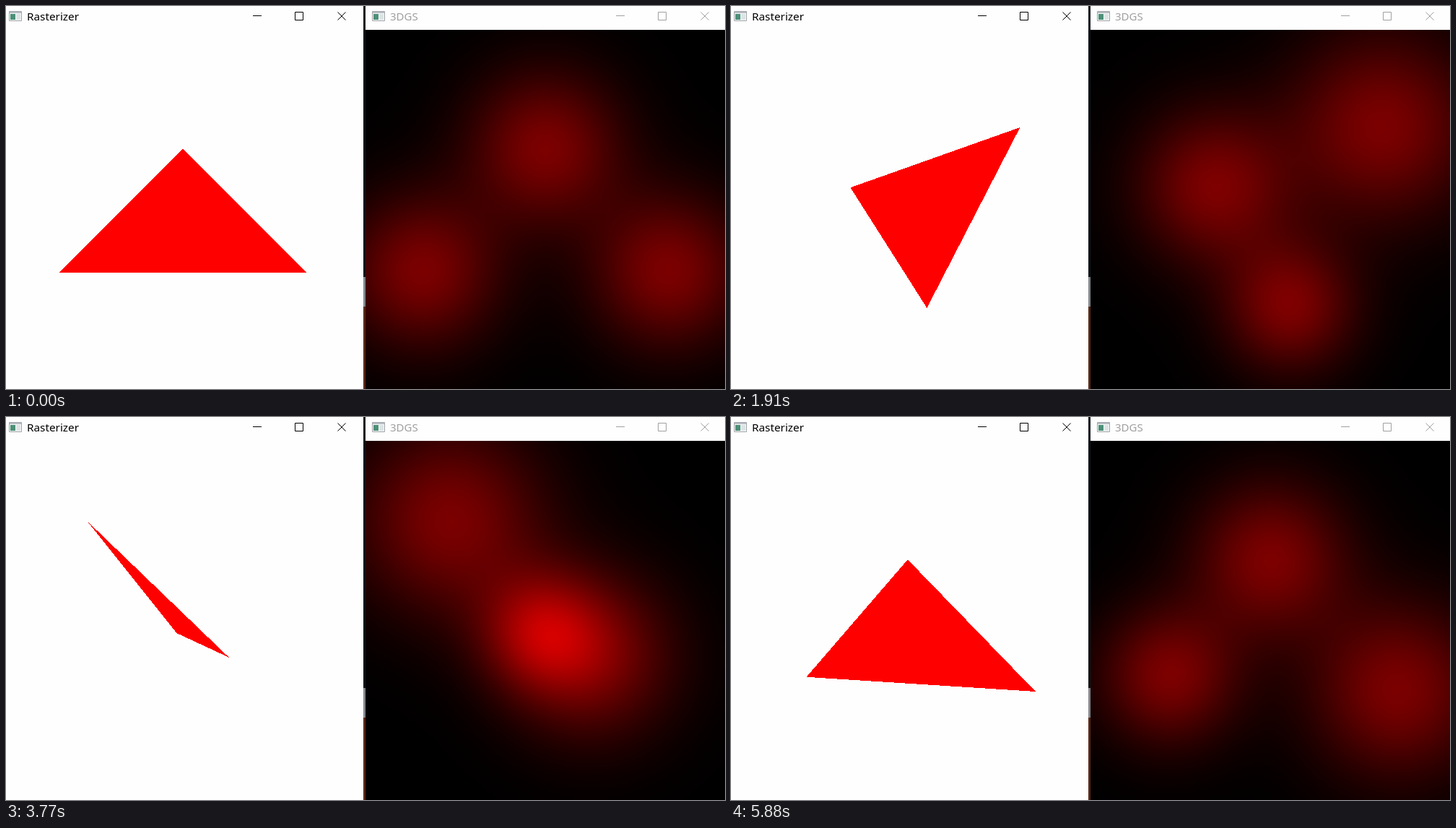
Animation of 996 by 530 pixels, one loop 6.4 s. Source, as an HTML page with a canvas:

```html
<!DOCTYPE html>
<html lang="en">
<head>
<meta charset="utf-8">
<title>Rasterizer and 3DGS</title>
<style>
  html, body { margin: 0; width: 996px; height: 530px; overflow: hidden; background: #fefefe; }
  svg, canvas { position: absolute; left: 0; top: 0; }
  canvas { left: 498px; top: 33px; width: 498px; height: 497px; }
  text { font: 15.3px "Noto Sans", "Open Sans", sans-serif; }
</style>
</head>
<body>
<svg width="996" height="530">
  <defs>
    <g id="icon">
      <path d="M.5 .5h17v13h-17z" fill="#f6f8f8" stroke="#a0a4a8"/>
      <path d="M1 1h16v2h-16z" fill="#b8bcc4"/>
      <path d="M2 4h7v8h-7z" fill="#4c9078"/>
      <path d="M10 4h6v8h-6z" fill="#dce4e4"/>
    </g>
    <path id="buttons" d="M0 13.5h12M58.5 8.5h11v11h-11zM117.5 8.5l11 11M128.5 8.5l-11 11" fill="none"/>
  </defs>
  <rect x="495" width="3" height="530" fill="#101418"/>
  <rect x="495" y="375" width="3" height="41" fill="#84888c"/>
  <rect x="495" y="416" width="3" height="114" fill="#582818"/>
  <use href="#icon" x="4" y="7"/>
  <use href="#icon" x="507" y="7"/>
  <text x="29" y="20">Rasterizer</text>
  <text x="532" y="20" fill="#a0a0a0" style="font-size:15px">3DGS</text>
  <use href="#buttons" x="342" stroke="#000"/>
  <use href="#buttons" x="845" stroke="#a0a0a0"/>
  <polygon id="tri" fill="#f00" shape-rendering="crispEdges"/>
</svg>
<canvas id="splats" width="125" height="125"></canvas>
<script>
const LOOP = 6400, STEP = 40, CELL = 4;
const FOCAL = 600, EYE = 7, CENTER_Y = 283;
const PEAK = 122, SPREAD = 11200;
const corners = [[0, 1], [-2, -1], [2, -1]];
const yaw = deg => [Math.cos(deg * Math.PI / 360), 0, Math.sin(deg * Math.PI / 360), 0];

// Orientation keys: time in ms, quaternion w x y z
const keys = [
  [0, yaw(0)],
  [200, yaw(0)],
  [1380, [-.04, .859, -.334, -.39]],
  [2430, [-.397, -.02, -.91, .117]],
  [3120, [-.297, -.865, -.217, -.341]],
  [3770, [-.465, -.653, -.116, .587]],
  [4380, yaw(-33)],
  [4620, yaw(-33)],
  [5150, yaw(40)],
  [5880, yaw(156)],
  [LOOP, yaw(156)]
];

const tri = document.getElementById('tri');
const ctx = document.getElementById('splats').getContext('2d');
const size = ctx.canvas.width;
const image = ctx.createImageData(size, size);

const normalize = q => {
  const length = Math.hypot(...q);
  return q.map(v => v / length);
};

function slerp(a, b, u) {
  let dot = a.reduce((sum, v, i) => sum + v * b[i], 0);
  const sign = dot < 0 ? -1 : 1;
  dot = Math.min(1, dot * sign);
  const angle = Math.acos(dot);
  if (angle < 1e-4) return a;
  const p = Math.sin((1 - u) * angle), q = sign * Math.sin(u * angle);
  return normalize(a.map((v, i) => p * v + q * b[i]));
}

function orientation(t) {
  const i = keys.findIndex(k => k[0] > t);
  const [t0, a] = keys[i - 1], [t1, b] = keys[i];
  const held = Math.floor((t - t0) / STEP) * STEP;
  return slerp(normalize(a), normalize(b), held / (t1 - t0));
}

function project([w, x, y, z]) {
  return corners.map(([px, py]) => {
    const rx = px * (1 - 2 * (y * y + z * z)) + py * 2 * (x * y - w * z);
    const ry = px * 2 * (x * y + w * z) + py * (1 - 2 * (x * x + z * z));
    const rz = px * 2 * (x * z - w * y) + py * 2 * (y * z + w * x);
    const depth = EYE - rz;
    return { x: FOCAL * rx / depth, y: CENTER_Y - FOCAL * ry / depth, scale: EYE / depth };
  });
}

// One additive Gaussian per corner, wider when nearer
function drawSplats(points) {
  const splats = points.map(p => ({ x: p.x + 250, y: p.y - 33, spread: SPREAD * p.scale ** 2 }));
  for (let i = 0; i < size * size; i++) {
    const x = (i % size + .5) * CELL, y = (Math.floor(i / size) + .5) * CELL;
    let sum = 0;
    for (const s of splats)
      sum += PEAK * Math.exp(-((x - s.x) ** 2 + (y - s.y) ** 2) / s.spread);
    image.data[4 * i] = sum;
    image.data[4 * i + 3] = 255;
  }
  ctx.putImageData(image, 0, 0);
}

function frame() {
  const points = project(orientation(performance.now() % LOOP));
  tri.setAttribute('points', points.map(p => `${p.x + 244.8},${p.y}`).join(' '));
  drawSplats(points);
  requestAnimationFrame(frame);
}
frame();
</script>
</body>
</html>
```
